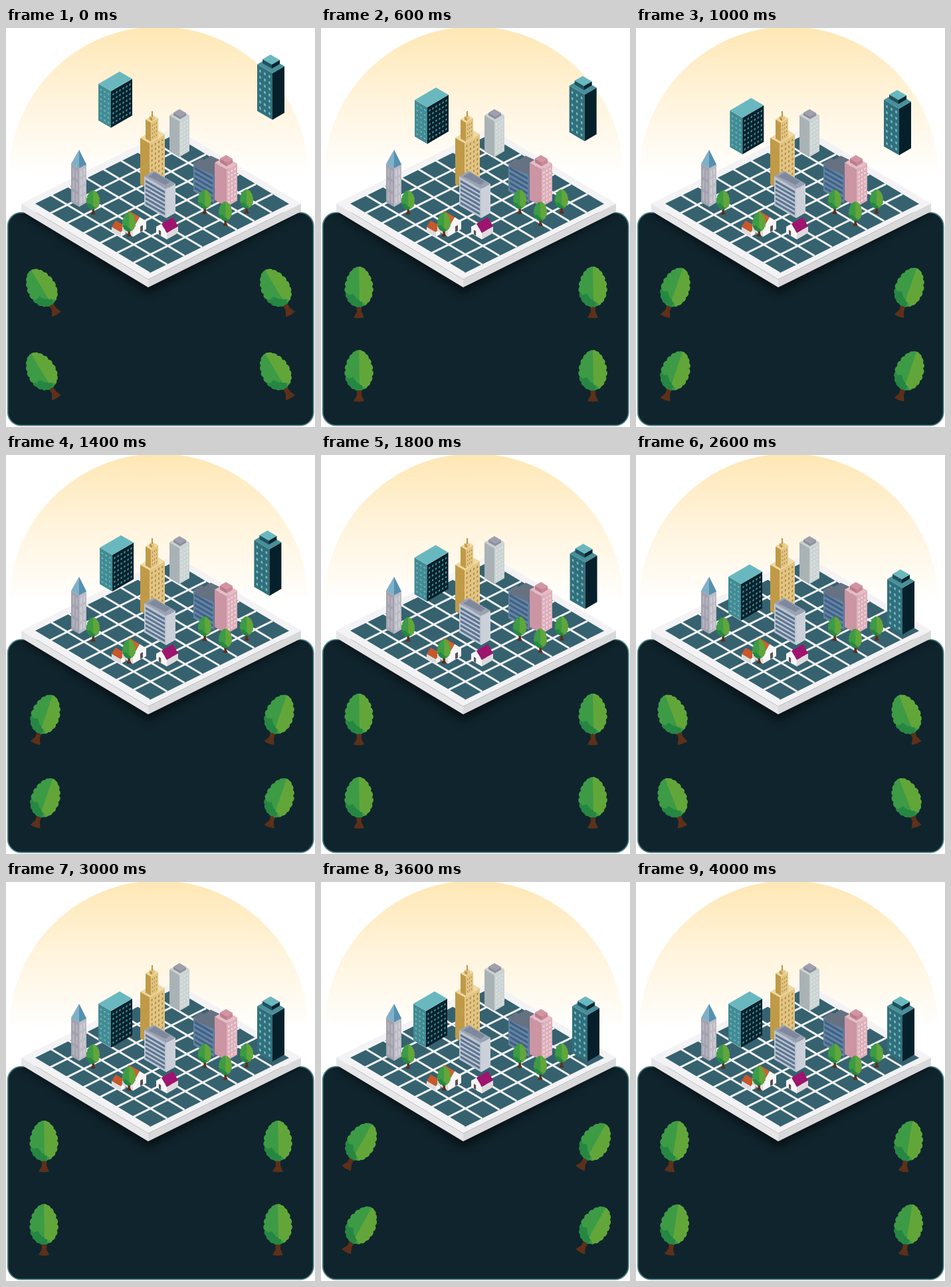
An HTML page that plays this animation: 465 by 600 pixels, repeating every 4200 ms.

```html
<!DOCTYPE html>
<html lang="en">
<head>
<meta charset="utf-8">
<title>Isometric city</title>
<style>
  html, body { margin: 0; width: 100%; height: 100%; overflow: hidden; background: #fff; }
  svg { display: block; width: 100%; height: 100%; }
</style>
</head>
<body>
<svg id="stage" viewBox="0 0 465 600"></svg>
<script>
const SLOPE = 0.58;
const STEP = 200, STEPS = 21, FALL_STEPS = 13, SWAY_STEPS = 12;

const range = n => Array.from({ length: n }, (_, i) => i);
const poly = (points, fill) => `<polygon points="${points}" fill="${fill}"/>`;
const rect = (x, y, w, h, fill) =>
  `<rect x="${x}" y="${y}" width="${w}" height="${h}" fill="${fill}"/>`;

// One wall in skewed space; windows = [columns, rows, colour, width share, height share]
function wall(x, y, w, h, slope, fill, windows) {
  let out = rect(0, 0, w, h, fill);
  if (windows) {
    const [cols, rows, color, fw = 0.5, fh = 0.5] = windows;
    const cw = (w - 2) / cols, ch = (h - 5) / rows;
    for (const r of range(rows))
      for (const c of range(cols))
        out += rect(1 + cw * (c + (1 - fw) / 2), 3 + ch * (r + (1 - fh) / 2), cw * fw, ch * fh, color);
  }
  return `<g transform="matrix(1 ${slope} 0 1 ${x} ${y})">${out}</g>`;
}

// (x, y) is the front corner of the roof
function prism(x, y, left, right, h, [top, leftFill, rightFill], winL, winR) {
  const roof = [
    x, y, x - left, y - left * SLOPE,
    x - left + right, y - (left + right) * SLOPE, x + right, y - right * SLOPE
  ];
  return wall(x - left, y - left * SLOPE, left, h, SLOPE, leftFill, winL) +
    wall(x, y, right, h, -SLOPE, rightFill, winR) + poly(roof, top);
}

// Gable to the left of the front corner (x, y), ridge running back to the right
function house(x, y, gable, depth, h, rise, roof, flip = 1) {
  const g = gable * SLOPE, d = depth * SLOPE, peak = -g / 2 - h - rise;
  return `<g transform="translate(${x} ${y}) scale(${flip} 1)">` +
    poly([0, 0, 0, -h, depth, -h - d, depth, -d], '#dedadc') +
    poly([0, 0, 0, -h, -gable / 2, peak, -gable, -g - h, -gable, -g], '#f7f5f5') +
    poly([0, -h, -gable / 2, peak, depth - gable / 2, peak - d, depth, -h - d], roof) +
    wall(-gable * 0.75, -g * 0.75 - h * 0.75, gable / 5, h * 0.7, SLOPE, '#5b5158') + '</g>';
}

// Egg-shaped crown with a scalloped rim
function crownPath() {
  const n = 20;
  const points = range(n).map(i => {
    const a = 2 * Math.PI * i / n;
    const x = 19.6 * Math.sin(a) * (1 - 0.14 * Math.cos(a));
    return `${x.toFixed(1)} ${(-8.5 - 30 * Math.cos(a)).toFixed(1)}`;
  });
  return `M${points[0]}` + [...points.slice(1), points[0]].map(p => `A6 6 0 0 1 ${p}`).join('') + 'Z';
}

function defs() {
  const crown = crownPath();
  return `<defs>
    <linearGradient id="sun" x1="0" y1="0" x2="0" y2="1">
      <stop offset="0" stop-color="#fee7b4"/>
      <stop offset=".5" stop-color="#fff4dd"/>
      <stop offset="1" stop-color="#fff"/>
    </linearGradient>
    <filter id="soft" x="-20%" y="-20%" width="140%" height="140%">
      <feGaussianBlur stdDeviation="7"/>
    </filter>
    <clipPath id="panel"><rect x="3" y="278" width="459" height="319" rx="19"/></clipPath>
    <clipPath id="crown"><path d="${crown}"/></clipPath>
    <g id="tree">
      <path d="M-4 15L-3 29L-8 38L0 39L8 38L4 29L4 15Z" fill="#5d3019"/>
      <path d="${crown}" fill="#3d9b45"/>
      <g clip-path="url(#crown)">
        <path d="M-25 -3L-15 4L-9 2L-3 10L5 13V30H-25Z" fill="#258742"/>
        <path d="M0 -42L1 13L6 15L12 20L25 15V-42Z" fill="#62a63a"/>
      </g>
    </g>
  </defs>`;
}

function board() {
  const L = [41, 264], B = [216, 368.5], T = [251, 160], cols = 7, rows = 8;
  const at = (u, v) => [0, 1].map(i => L[i] + u * (B[i] - L[i]) + v * (T[i] - L[i]));
  const line = (a, b) => `M${a}L${b}`;
  const grid = range(cols).map(i => line(at(i / cols, 0), at(i / cols, 1))).join('') +
    range(rows).map(i => line(at(0, i / rows), at(1, i / rows))).join('');
  return `<g clip-path="url(#panel)"><polygon points="18,274 214,400 449,274 253,160"
      fill="#000" opacity=".5" filter="url(#soft)"/></g>` +
    poly('23,264 214,378 214,390 23,275', '#e6e5e7') +
    poly('444,264 214,378 214,390 444,276', '#d9d8da') +
    poly('23,264 214,378 444,264 253,150', '#f3f2f4') +
    poly([at(0, 0), at(1, 0), at(1, 1), at(0, 1)].join(' '), '#366270') +
    `<path d="${grid}" stroke="#f3f4f6" stroke-width="3"/>`;
}

function skyline() {
  const grey = ['#c9d0d1', '#a9b2b5', '#cbd3d3'];
  const tan = ['#efd9a0', '#c09a47', '#e3c583'];
  const pink = ['#e6bcc5', '#cb95a3', '#ddb0bb'];
  const blue = ['#667181', '#6584a2', '#4f6a88'];
  return prism(261, 140, 15, 15, 54, grey, null, [3, 8, '#dbe1e0', 0.5]) +
    prism(262, 133, 10, 9, 4, ['#a09fae', '#8b8c9b', '#8f91a0']) +
    prism(216, 173, 14, 23, 70, tan, null, [4, 9, '#b18d4b', 0.4, 0.45]) +
    prism(218, 142, 8, 11, 29, tan, null, [3, 4, '#b18d4b', 0.4, 0.45]) +
    prism(220, 135, 4, 4, 5, tan) + rect(219, 125, 2, 9, '#b8954d') +
    // tower with the pointed roof
    prism(110, 211, 12, 11, 58, ['#b6b4c0', '#a3a1ae', '#bdbbc5'],
      [2, 3, '#b6b4be', 0.5, 0.75], [2, 4, '#d3d1d7', 0.4, 0.7]) +
    poly('110,183 98,204 110,211', '#7fb0c8') + poly('110,183 110,211 121,205', '#5590ae') +
    // blue building with the sloping roof
    prism(313, 221, 31, 12, 42, blue, [1, 5, '#3f6187', 0.95, 0.5], [1, 5, '#7490ab', 0.7, 0.3]) +
    poly('282,208 308,192 325,200 313,221', blue[0]) +
    prism(332, 213, 18, 16, 56, pink, null, [3, 8, '#f1dadd', 0.45, 0.45]) +
    prism(332, 202, 10, 9, 6, ['#d195a2', '#bd7c8c', '#c78897']) +
    // office block
    prism(241, 242, 33, 14, 44, ['#9aa2b4', '#bcc4d0', '#ccd1d9'], [1, 6, '#5c7592', 0.94, 0.55]) +
    poly('214,223 224,217 247,231 240,236', '#7f899d');
}

const houses = () =>
  house(173, 314, 12, 14, 7, 6, '#c9572a', -1) +
  house(191, 314, 20, 16, 12, 12, '#d5602c', -1) +
  house(242, 318, 16, 17, 10, 9, '#9f146e');

const tree = ([x, y]) => `<use href="#tree" transform="translate(${x} ${y}) scale(.47)"/>`;
const parkTrees = [[131, 262.5], [185, 295.5], [299, 261.5], [330, 279.5], [362, 261]];
const bigTrees = range(4).map(i => [57 + 352 * (i % 2), 397.5 + 125.5 * (i >> 1)]);

const teal = prism(158, 95, 19, 32, 55, ['#6ab8bf', '#418b94', '#08212c'],
  [3, 7, '#6db1b7', 0.45, 0.35], [6, 7, '#428f99', 0.45, 0.4]);
const tower = prism(401, 68, 23, 18, 70, ['#488f9a', '#30707d', '#06202b'],
  [3, 7, '#7dbbc1', 0.35, 0.4]) +
  prism(400, 55, 14, 12, 6, ['#6ab8bf', '#20515e', '#08242f']);

const stage = document.getElementById('stage');
stage.innerHTML = defs() +
  `<path d="M5 222A225 224 0 0 1 455 222Z" fill="url(#sun)"/>
   <rect x="2.7" y="277.7" width="460" height="320" rx="20" fill="#10242d" stroke="#4c8183" stroke-width="1.8"/>` +
  board() + `<g id="teal">${teal}</g>` + skyline() + houses() +
  parkTrees.map(tree).join('') + `<g id="tower">${tower}</g>` +
  bigTrees.map(() => '<use class="sway" href="#tree"/>').join('');

const tealEl = document.getElementById('teal');
const towerEl = document.getElementById('tower');
const swayEls = [...document.querySelectorAll('.sway')];

// Falls by `drop` along a path that bows sideways by `bow`
function lower(el, p, drop, bow) {
  const x = bow * Math.sin(Math.PI * Math.pow(p, 0.75));
  const y = drop * (p + 0.02 * Math.sin(Math.PI * p));
  el.setAttribute('transform', `translate(${x} ${y})`);
}

function draw(now) {
  const step = Math.floor(now / STEP) % STEPS;
  const p = Math.min(step / FALL_STEPS, 1);
  lower(tealEl, p, 99, 2.3);
  lower(towerEl, p, 132, -5);

  // Trees rock evenly between -30 and 30 degrees
  const half = SWAY_STEPS / 2;
  const angle = 30 - 60 / half * Math.abs(step % SWAY_STEPS - half);
  swayEls.forEach((el, i) =>
    el.setAttribute('transform', `translate(${bigTrees[i]}) rotate(${angle})`));
}

function tick() {
  draw(performance.now());
  requestAnimationFrame(tick);
}
tick();
</script>
</body>
</html>
```
